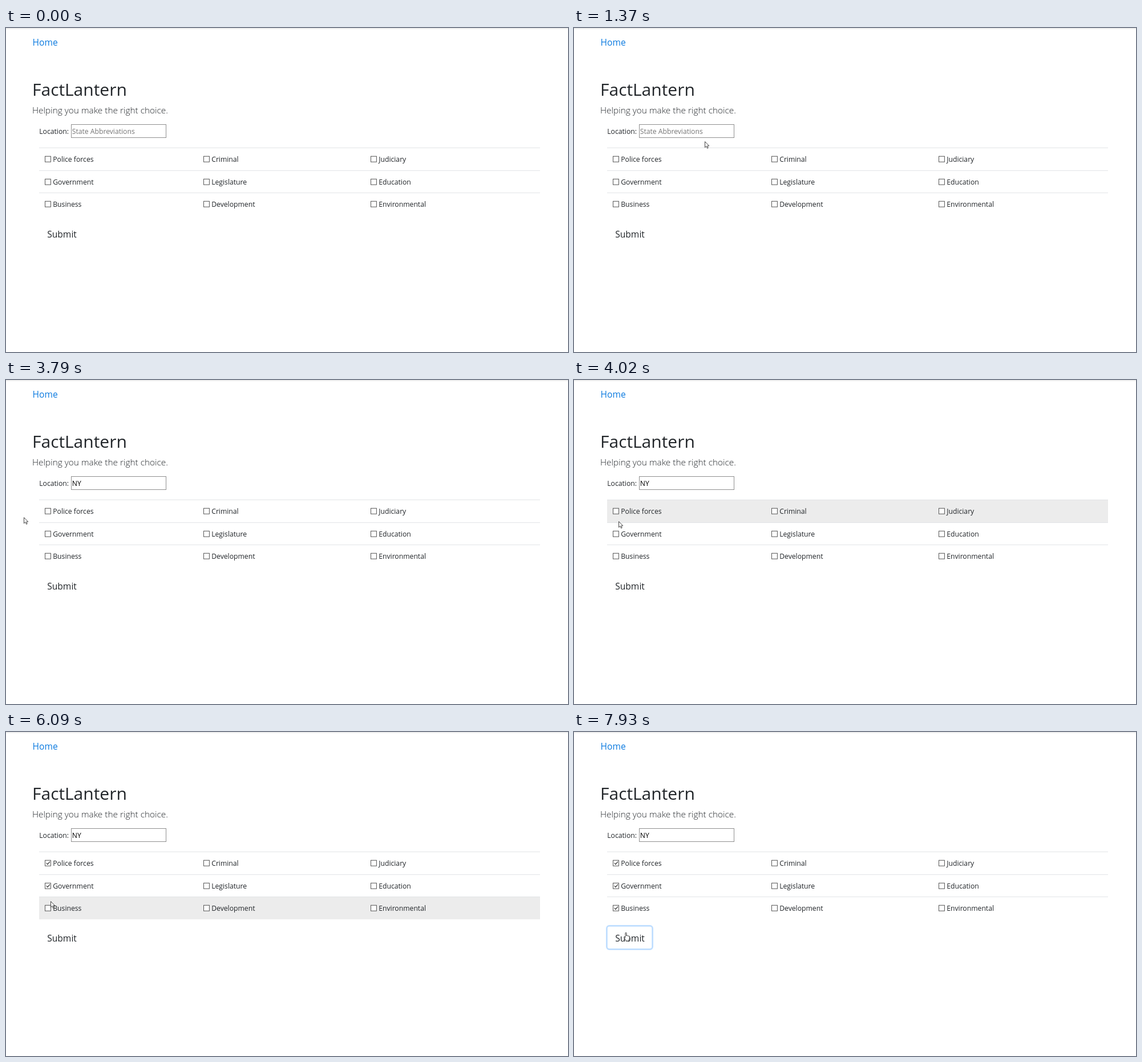
Write an HTML page that moves like this. It is 985 px wide and 569 px high and loops after 8000 ms.

```html
<!DOCTYPE html>
<html lang="en">
<head>
<meta charset="utf-8">
<title>FactLantern</title>
<style>
  html, body { margin: 0; width: 100%; height: 100%; overflow: hidden; background: #fff; }
  svg { display: block; width: 985px; height: 569px; }
  text { font: 12.2px "Open Sans", "Noto Sans", sans-serif; fill: #212529; white-space: pre; }
  .crisp { shape-rendering: crispEdges; }
  .large { font-size: 15.6px; }
</style>
</head>
<body>
<svg id="stage" viewBox="0 0 985 569">
  <rect class="crisp" width="985" height="2" fill="#eee"/>
  <text class="large" x="46.6" y="31" style="fill:#0c7be0">Home</text>
  <text x="46" y="119" style="font-size:30px">FactLantern</text>
  <text x="46" y="150" style="font-size:15.4px;font-weight:300">Helping you make the right choice.</text>
  <text x="58.3" y="186">Location:</text>
  <rect id="field" class="crisp" x="114.5" y="169.5" width="166" height="23" fill="#fff"/>
  <text id="entry" x="115.7" y="186"></text>
  <rect id="caret" class="crisp" x="116" y="173" width="1" height="16" fill="#000"/>
  <g id="table"></g>
  <rect id="ring" x="57.4" y="340.4" width="80.2" height="41.2" rx="4.5" fill="none" stroke="#bfdeff" stroke-width="2.7"/>
  <text class="large" x="72.2" y="368">Submit</text>
  <g id="pointer">
    <path id="arrow" d="M.5 .5V10.8L2.9 8.6L4.6 12.3L6.2 11.6L4.6 8H7.8Z" fill="#fff" stroke="#333" stroke-width=".9"/>
    <path id="beam" class="crisp" d="M-1.5 -4.5H2.5M-1.5 5.5H2.5M.5 -4.5V5.5" fill="none" stroke="#333"/>
    <path id="hand" d="M-1 1Q0 -.6 1 1V6L2 5.3L3 6.3L4.2 5.7L5 6.8L6.3 6.5V11L5 13V15H-.2V13.2L-3.4 9Q-3.4 7.4 -1 9Z" fill="#fff" stroke="#333" stroke-width=".9"/>
  </g>
</svg>
<script>
const LOOP = 8000;
const TICK = 110;          // pointer refresh interval
const ENTER = 620;         // pointer comes into view
const $ = id => document.getElementById(id);
const show = (node, on) => node.setAttribute("visibility", on ? "visible" : "hidden");

const labels = [
  ["Police forces", "Criminal", "Judiciary"],
  ["Government", "Legislature", "Education"],
  ["Business", "Development", "Environmental"]
];
const columns = [68, 346, 639];
const tickTimes = [4750, 5540, 6520];
const rowTop = r => Math.round(210 + 39.6 * r);

// Each leg curves on from where the previous one ended.
const entryPoint = [880, 545];
const legs = [
  { start: ENTER, end: 1370, via: [650, 200], to: [229, 199], ease: 2 },
  { start: 1380, end: 1710, via: [222, 193], to: [217, 190] },
  { start: 3280, end: 3600, via: [110, 194], to: [11, 218] },
  { start: 3600, end: 4020, via: [50, 272], to: [78, 248] },
  { start: 4100, end: 4640, via: [50, 238], to: [73, 230] },
  { start: 4750, end: 5120, via: [74, 236], to: [76, 258] },
  { start: 5120, end: 5430, via: [73, 266], to: [73, 270] },
  { start: 5640, end: 6300, via: [82, 296], to: [76, 304] },
  { start: 6640, end: 7510, via: [76, 285], to: [91, 352] }
];

const bend = (a, b, c, u) => (1 - u) ** 2 * a + 2 * u * (1 - u) * b + u * u * c;

function pointerAt(t) {
  let from = entryPoint;
  for (const { start, end, via, to, ease = 1 } of legs) {
    if (t < start) break;
    if (t < end) {
      const elapsed = Math.floor((t - start) / TICK) * TICK;
      const u = 1 - (1 - elapsed / (end - start)) ** ease;
      return from.map((p, i) => Math.round(bend(p, via[i], to[i], u)));
    }
    from = to;
  }
  return from;
}

function rowMarkup(names, r) {
  const top = rowTop(r), height = rowTop(r + 1) - top;
  const cells = names.map((name, c) => {
    const x = columns[c], y = top + 15;
    const mark = c ? "" :
      `<path class="tick" d="M${x + 2.7} ${y + 5}l2.2 2.4l4 -4.8" fill="none" stroke="#222" stroke-width="1.1"/>`;
    return `<rect x="${x + .5}" y="${y + .3}" width="9.9" height="9.9" fill="#fff" stroke="#555"/>${mark}
      <text x="${x + 14.2}" y="${top + 25}">${name}</text>`;
  }).join("");
  return `<rect class="hover crisp" x="58" y="${top}" width="878" height="${height}" fill="#ececec"/>
    <rect class="crisp" x="58" y="${top}" width="878" height="1" fill="#e2e4e7"/>${cells}`;
}

$("table").innerHTML = labels.map(rowMarkup).join("");
const hovers = document.querySelectorAll(".hover");
const ticks = document.querySelectorAll(".tick");

function drawField(t) {
  const typed = t >= 2800 ? "NY" : t >= 2590 ? "N" : "";
  const focused = t >= 1830 && t < 3600;
  $("entry").textContent = typed || "State Abbreviations";
  $("entry").style.fill = typed ? "#000" : "#757575";
  $("field").setAttribute("stroke", focused ? "#333" : "#8f8f8f");
  show($("caret"), t >= 1830 && t < 2360);
}

function drawPointer(t) {
  const [x, y] = pointerAt(t);
  const visible = t >= ENTER;
  const inField = x > 113 && x < 281 && y > 169 && y < 193;
  const onButton = x > 58 && x < 137 && y > 341 && y < 381;
  $("pointer").setAttribute("transform", `translate(${x} ${y})`);
  show($("beam"), visible && inField);
  show($("hand"), visible && onButton);
  show($("arrow"), visible && !inField && !onButton);
  hovers.forEach((bar, r) =>
    show(bar, visible && x >= 58 && x < 936 && y >= rowTop(r) && y < rowTop(r + 1)));
}

function draw(t) {
  drawField(t);
  drawPointer(t);
  ticks.forEach((tick, r) => show(tick, t >= tickTimes[r]));
  const glow = Math.floor((t - 7600) / TICK) / 3;
  $("ring").setAttribute("opacity", Math.min(1, Math.max(0, glow)));
}

const start = performance.now();
function frame() {
  draw((performance.now() - start) % LOOP);
  requestAnimationFrame(frame);
}
draw(0);
requestAnimationFrame(frame);
</script>
</body>
</html>
```
